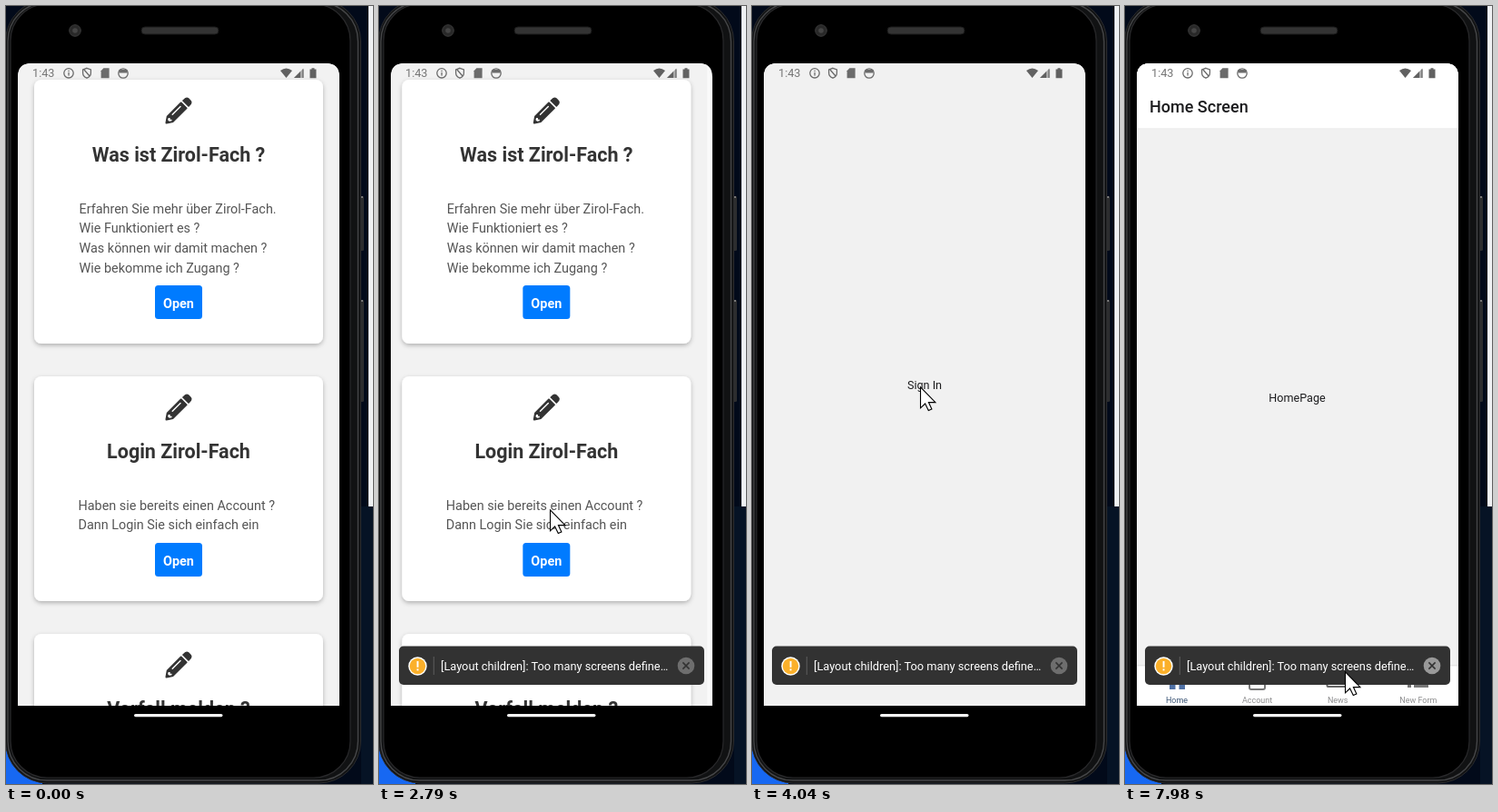
Animation of 404x855 px, one loop 8 s. Source, as an HTML page:

```html
<!DOCTYPE html>
<html lang="de">
<head>
<meta charset="utf-8">
<title>App</title>
<style>
html, body { margin: 0; width: 100%; height: 100%; overflow: hidden; background: #030b1a; }
svg { display: block; font-family: Roboto, Arial, sans-serif; }
.title { font: bold 21.5px Roboto, sans-serif; fill: #333; text-anchor: middle; }
.body { font-size: 14.4px; fill: #555; }
.open { font: bold 14.4px Roboto, sans-serif; fill: #fff; text-anchor: middle; }
.page { font-size: 12.6px; fill: #1c1c1e; text-anchor: middle; }
.tab { font-size: 9px; fill: #8e8e8f; text-anchor: middle; }
</style>
</head>
<body>
<svg id="stage" width="404" height="855" viewBox="0 0 404 855"></svg>
<script>
const LOOP = 8000;
const TICK = 70; // the picture advances in steps of this many ms
const stage = document.getElementById('stage');

const rect = (x, y, w, h, fill, extra = '') =>
  `<rect x="${x}" y="${y}" width="${w}" height="${h}" fill="${fill}" ${extra}/>`;
const circle = (x, y, r, fill, extra = '') =>
  `<circle cx="${x}" cy="${y}" r="${r}" fill="${fill}" ${extra}/>`;
const path = (d, fill, extra = '') => `<path d="${d}" fill="${fill}" ${extra}/>`;
const text = (x, y, cls, s, extra = '') =>
  `<text x="${x}" y="${y}" class="${cls}" ${extra}>${s}</text>`;

const pencil = (x, y) => `<g transform="translate(${x} ${y})">` +
  path('M2.2-9.4Q2.8-9.8 3.4-9.3L9.4-3.3Q9.9-2.7 9.4-2.2L-6 13.1-13.2 14.5Q-14.8 14.6-14.5 13L-13.2 6Z', '#333') +
  path('M4.4-11.6 7.3-14Q9.3-15.2 11.2-13.7L13.8-11Q15.2-9.2 14-7.2L11.6-4.6Q11-4.1 10.4-4.6L4.4-10.6Q4-11.1 4.4-11.6Z', '#333') +
  path('M-6.8 4.2 2-4.5', 'none', 'stroke="#fff" stroke-width="1.4" stroke-linecap="round"') +
  path('M-11.3 8H-9.4V9.7H-7.5V11.3L-10.2 11.8-11.9 10.3Z', '#fff') + '</g>';

function card(y, height, title, lines) {
  const buttonY = y + height - 64;
  const textX = lines.length > 2 ? 80.5 : 79.5;
  return rect(31, y, 318, height, '#fff', 'rx="8" filter="url(#shadow)"') +
    pencil(190, y + 34) + text(190, y + 89.5, 'title', title) +
    lines.map((s, i) => text(textX, y + 146.8 + i * 21.6, 'body', s)).join('') +
    rect(164, buttonY, 52, 37, '#007bff', 'rx="3.5"') + text(190, buttonY + 24.5, 'open', 'Open');
}

const menu = rect(13, 63, 354, 706, '#f2f2f2') +
  card(81, 290, 'Was ist Zirol-Fach ?', ['Erfahren Sie mehr über Zirol-Fach.', 'Wie Funktioniert es ?',
    'Was können wir damit machen ?', 'Wie bekomme ich Zugang ?']) +
  card(407, 247, 'Login Zirol-Fach', ['Haben sie bereits einen Account ?', 'Dann Login Sie sich einfach ein']) +
  card(690, 247, 'Vorfall melden ?', []);

const signIn = rect(13, 63, 354, 706, '#f1f1f1') + text(190, 421, 'page', 'Sign In');

const tabs = ['Home', 'Account', 'News', 'New Form'].map((name, i) =>
  text(57 + i * 88.6, 766, 'tab', name, i ? '' : 'style="fill:#3f5878"')).join('');

const home = rect(13, 63, 354, 706, '#f1f1f1') +
  rect(13, 63, 354, 72, '#fff') + rect(13, 134.5, 354, .8, '#e4e4e4') +
  text(27, 117, '', 'Home Screen', 'font-size="18" font-weight="500" fill="#1c1c1e"') +
  text(189.5, 435, 'page', 'HomePage') +
  rect(13, 725, 354, 44, '#fff') + rect(13, 724.5, 354, .8, '#dadada') +
  rect(49, 738, 6.5, 13, '#4f70a5') + rect(59.5, 738, 6.5, 13, '#4f70a5') +
  rect(137, 738, 17, 13, 'none', 'rx="2" stroke="#777" stroke-width="2"') +
  rect(222.5, 734, 23, 14, 'none', 'rx="1" stroke="#666" stroke-width="2"') +
  rect(311, 744, 4, 5, '#777') + rect(318, 746, 16, 3, '#777') + tabs;

const toast = rect(22, 703.5, 336, 42.5, '#323232', 'rx="5"') +
  circle(42.5, 725.5, 10.2, '#fff') + circle(42.5, 725.5, 8.7, '#fbb02a') +
  rect(41.6, 720, 1.9, 6.8, '#fff') + rect(41.6, 728.4, 1.9, 2, '#fff') +
  rect(59.8, 715, 1, 20, '#5c5c5c') +
  text(68, 730, '', '[Layout children]: Too many screens define…', 'font-size="12.8" fill="#fff"') +
  circle(338, 725, 9.3, '#6e6e6e', 'id="close"') +
  path('M334.4 721.4l7.2 7.2m0-7.2l-7.2 7.2', 'none', 'stroke="#323232" stroke-width="1.5"');

const line = 'stroke="#6b6b6b" stroke-width="1.3"';
const statusBar = text(29, 78.3, '', '1:43', 'font-size="12.7" fill="#757575"') +
  circle(69, 73.8, 5.2, 'none', line) + rect(68.4, 73, 1.3, 3.6, '#6b6b6b') + rect(68.4, 70.8, 1.3, 1.3, '#6b6b6b') +
  path('M89 68.3l4.4 1.7v3.4q0 4-4.4 5.8q-4.4-1.8-4.4-5.8v-3.4zM86 70l6 7', 'none', line) +
  path('M107.4 68.3h6.2v10.9h-9v-8z', '#6b6b6b') +
  circle(129, 74, 5.2, 'none', line) + path('M124.5 70h9v3.4h-9z', '#6b6b6b') +
  path('M302 71q6.5-5 13 0l-6.5 8z', '#616161') +
  path('M327.5 68.5v10.5h-10.5z', '#aaa') + path('M324 72v7h-7zM326.4 69.6h1.1v9.4h-1.1z', '#616161') +
  path('M336.5 69.5v-1.2h3v1.2h2v9.7h-7v-9.7z', '#616161');

const sideButton = (y, h) => rect(388, y, 6, h, '#2c2d2f', 'rx="1.5"') + rect(389, y, 4, 2, '#777');
const phone = rect(0, 0, 404, 855, '#020a1a') + rect(391, 550, 13, 305, '#061325') +
  rect(399, 0, 5, 550, '#f0f2f4') + rect(0, 800, 40, 55, '#1768f2') +
  sideButton(209, 60) + sideButton(323, 112) +
  rect(-.5, -7, 391, 861, '#111213', 'rx="46" stroke="#2b2c2e"') +
  rect(2, -4, 385.5, 855, 'none', 'rx="43" stroke="#454648" stroke-width="1.4"') +
  rect(5, -2, 374, 850, '#000', 'rx="40" stroke="#29292b" stroke-width="1.2"') +
  rect(149, 23, 85, 8, '#333', 'rx="4" stroke="#1b1b1b"') +
  circle(76, 27, 6.3, '#292929', 'stroke="#3a3a3a"') + circle(76, 27, 2.8, '#454545');

stage.innerHTML = `<defs>
  <filter id="shadow" x="-10%" y="-10%" width="120%" height="125%">
    <feDropShadow dx="0" dy="2" stdDeviation="2.5" flood-opacity=".27"/>
  </filter>
  <clipPath id="screen"><path d="M13 769V78Q13 63 28 63H352Q367 63 367 78V769Z"/></clipPath>
  </defs>${phone}
  <g clip-path="url(#screen)">${rect(13, 63, 354, 706, '#fafafa')}
    <g id="menu">${menu}</g><g id="signIn">${signIn}</g><g id="home">${home}</g>
    <g id="toast">${toast}</g>${statusBar}
  </g>
  ${rect(141, 778, 97.5, 3.2, '#f4f4f4', 'rx="1.6"')}
  ${circle(0, 0, 18, '#ff0', 'id="ring" fill-opacity=".47"')}
  <g id="cursor">${path('M.5.8V23.8L5.6 19 9.3 26.6 12.9 25 9.4 17.6H16.9Z', '#fff', 'stroke="#000" stroke-width="1.1"')}</g>`;

const part = Object.fromEntries(['menu', 'signIn', 'home', 'toast', 'close', 'ring', 'cursor']
  .map(id => [id, document.getElementById(id)]));

// Each pointer move continues from the last one, optionally bent towards a control point.
const entry = [330, 725];
const moves = [
  { start: 130, end: 270, to: [275, 594] },
  { start: 530, end: 1230, to: [194, 594], bend: [150, 510] },
  { start: 1360, end: 1500, to: [194, 600] },
  { start: 1980, end: 2330, to: [188, 553] },
  { start: 2930, end: 3410, to: [180, 505], bend: [181, 515] },
  { start: 3480, end: 4040, to: [185, 418], bend: [213, 440] },
  { start: 4570, end: 4770, to: [187, 418] },
  { start: 4970, end: 5460, to: [196, 435], bend: [191, 420] },
  { start: 5740, end: 5880, to: [198, 440] },
  { start: 6080, end: 6290, to: [238, 606] },
  { start: 6550, end: 7100, to: [342, 722], bend: [428, 808] },
  { start: 7300, end: 7440, to: [342, 719] },
  { start: 7700, end: 7980, to: [242, 731] }
];

const clamp = v => Math.min(1, Math.max(0, v));
const stepsSince = (t, start) => Math.floor((t - start) / TICK + .01);

function pointerAt(t) {
  let pos = entry;
  for (const { start, end, to, bend } of moves) {
    if (t < start) break;
    const p = clamp((stepsSince(t, start) + 1) / (Math.round((end - start) / TICK) + 1));
    pos = pos.map((from, axis) => {
      const mid = bend ? bend[axis] : (from + to[axis]) / 2;
      return (1 - p) ** 2 * from + 2 * p * (1 - p) * mid + p * p * to[axis];
    });
  }
  return pos.map(Math.round);
}

const SLIDE = 35.4;
const SLIDE_START = 2660;
const within = (t, from, to) => t >= from && t < to;
const show = (el, on) => el.setAttribute('visibility', on ? 'visible' : 'hidden');
const place = (el, x, y) => el.setAttribute('transform', `translate(${x} ${y})`);

function render(t) {
  const [x, y] = pointerAt(t);
  place(part.cursor, x, y);
  place(part.ring, x, y);
  show(part.cursor, t >= moves[0].start);
  show(part.ring, within(t, 1640, 1700) || within(t, 4440, 4570));

  const slideTime = SLIDE_START + stepsSince(t, SLIDE_START) * TICK;
  const shift = t < SLIDE_START ? 0 : SLIDE / (1 + Math.exp((2783 - slideTime) / 32));
  place(part.menu, -shift, 0);
  place(part.signIn, SLIDE - shift, 0);
  part.signIn.setAttribute('opacity', clamp((slideTime - 2790) / 80 + .1));
  show(part.home, t >= 5740);
  show(part.toast, t >= SLIDE_START);
  part.close.setAttribute('fill', t >= 7700 ? '#999' : '#6e6e6e');
}

const began = performance.now();
function tick() {
  render(Math.max(0, performance.now() - began) % LOOP);
  requestAnimationFrame(tick);
}
tick();
</script>
</body>
</html>
```
